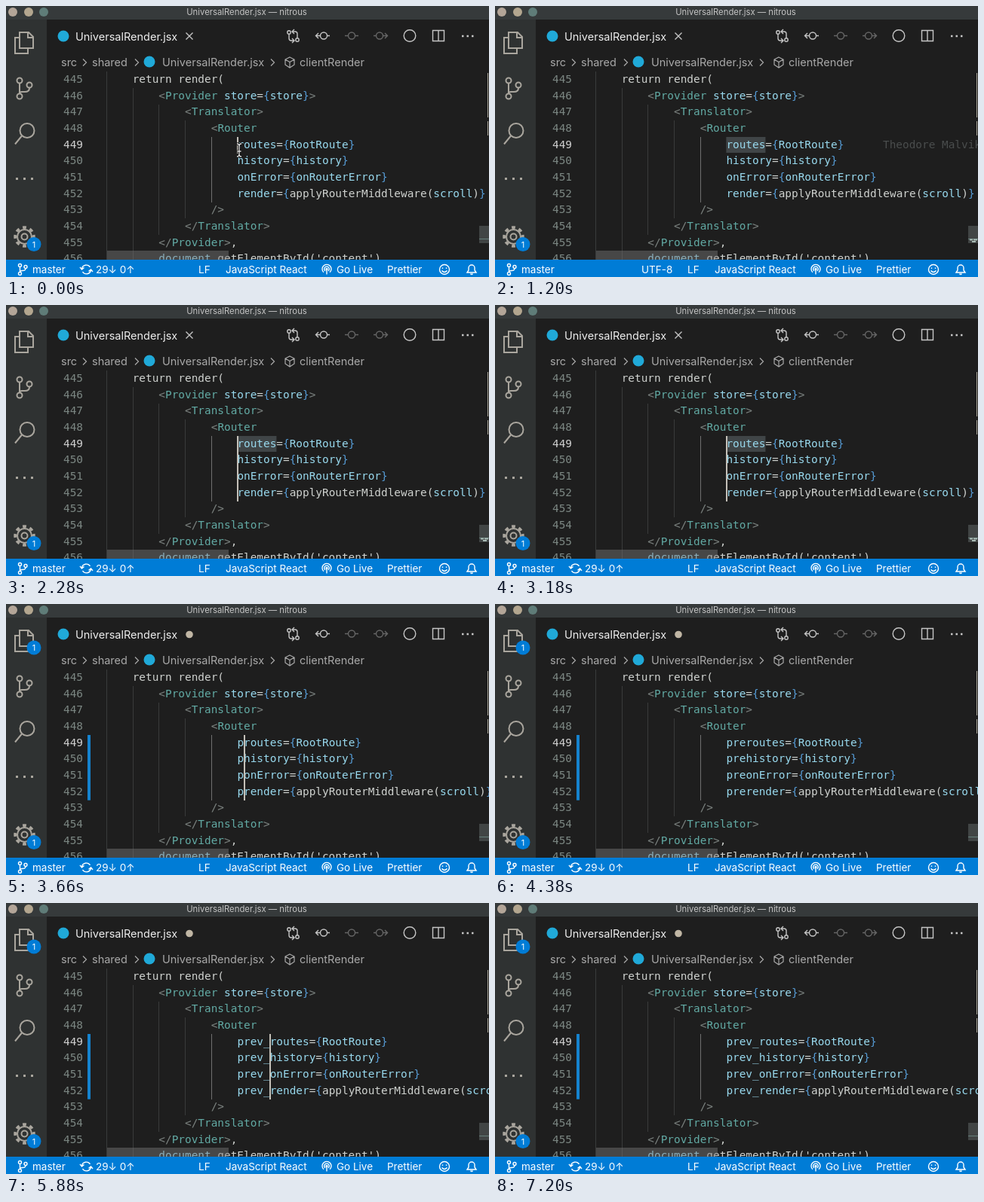
These frames come from a looping animation (640x360 px, 7.44 s). An HTML page:

```html
<!DOCTYPE html>
<html lang="en">
<head>
<meta charset="utf-8">
<title>Multi-cursor editing</title>
<style>
  html, body { margin: 0; width: 100%; height: 100%; overflow: hidden; background: #1e1e1e; }
  svg { display: block; width: 640px; height: 360px; }
  text { font: 14.5px Inter, sans-serif; fill: #a9a9a9; white-space: pre; }
  .title { font-size: 11.3px; fill: #c4c4c4; }
  .status text { font-size: 13.5px; fill: #fff; }
  .badge circle { fill: #007cd6; }
  .badge text { font-size: 11px; fill: #fff; text-anchor: middle; }
  .code text { font: 14.4px "DejaVu Sans Mono", monospace; fill: #cfd2cf; }
  .code .number { fill: #7c8783; }
  .code .current { fill: #d0d0d0; }
  .code .blame { fill: #4a4d4d; }
  .punct { fill: #7c8380; }
  .brace { fill: #569cd6; }
  .tag { fill: #62aaa4; }
  .attr { fill: #98d9ee; }
  .icon { fill: none; stroke: #c5c5c5; stroke-width: 1.4; }
  .side { stroke: #aaa69e; stroke-width: 2; }
  .dim { stroke: #666; }
  .thin { stroke: #a9a9a9; stroke-width: 1.2; }
  .status .icon { stroke: #fff; }
</style>
</head>
<body>
<svg viewBox="0 0 640 360">
  <rect width="640" height="360" fill="#1e1e1e"/>

  <g class="code" id="code"></g>

  <!-- scrollbars and overview -->
  <rect x="134" y="325" width="161" height="12" fill="#797979" opacity=".45"/>
  <rect x="627" y="292" width="13" height="23" fill="#414545"/>
  <path d="M627 309.500h13" stroke="#66807c"/>
  <path id="marks" d="M629 310.500h4M634 310.500h5M632 313h5" stroke="#a9bbb5" stroke-width="2"/>
  <path d="M638.500 89v59M638.500 153v19" stroke="#b0ab9e"/>

  <!-- title bar -->
  <rect width="640" height="18" fill="#363a3b"/>
  <circle cx="9" cy="8" r="6" fill="#b3a598"/>
  <circle cx="30" cy="8" r="6" fill="#b3a68f"/>
  <circle cx="50" cy="8" r="6" fill="#5f7c78"/>
  <text class="title" x="319" y="12" text-anchor="middle">UniversalRender.jsx — nitrous</text>

  <!-- activity bar -->
  <rect y="18" width="54" height="319" fill="#2f3232"/>
  <g class="icon side">
    <path d="M18 35h12l6 6v15h-18zM29 35v7h7M18 42h-6v21h17v-7"/>
    <circle cx="18" cy="99" r="3.500"/><circle cx="18" cy="120" r="3.500"/><circle cx="31" cy="105" r="3.500"/>
    <path d="M18 103v13M31 109q0 5-6 5h-4q-3 0-3 3"/>
    <circle cx="28" cy="165.500" r="9.500"/><path d="M21 172.500L12 183.500"/>
    <path d="M13 229.500h3M23 229.500h3M33 229.500h3" stroke-width="3"/>
    <circle cx="24.500" cy="306.500" r="4"/>
    <circle cx="24.500" cy="306.500" r="9.500"/>
    <circle cx="24.500" cy="306.500" r="12.200" stroke-width="4" pathLength="16" stroke-dasharray="1" stroke-dashoffset=".5"/>
  </g>
  <g class="badge"><circle cx="37" cy="316.500" r="9.500"/><text x="37" y="320.500">1</text></g>
  <g class="badge" id="unsaved"><circle cx="37" cy="58" r="9.500"/><text x="37" y="62">1</text></g>

  <!-- tab and editor actions -->
  <circle cx="76" cy="40" r="7.500" fill="#20a9d8"/>
  <text x="92" y="45.500" style="fill:#eee">UniversalRender.jsx</text>
  <path id="close" class="icon" d="M238.500 35.500l9 9m0-9l-9 9"/>
  <circle id="dirty" cx="243" cy="40.500" r="4.800" fill="#c0b6a4"/>
  <g class="icon">
    <circle cx="375" cy="35" r="2.200"/><circle cx="386" cy="45" r="2.200"/>
    <path d="M375 37v6q0 3 3 3h4m-3-3l3 3-3 3M386 43v-6q0-3-3-3h-4m3-3l-3 3 3 3"/>
    <circle cx="421" cy="39.500" r="4.500"/><path d="M425.500 39.500h3.500M416.500 39.500h-6m3.500-3.500l-3.500 3.500 3.500 3.500"/>
    <g class="dim">
      <circle cx="458" cy="39.500" r="4.500"/><path d="M449 39.500h4.500M462.500 39.500h4.500"/>
      <circle cx="495" cy="39.500" r="4.500"/><path d="M487 39.500h3.500M499.500 39.500h6m-3.500-3.500l3.500 3.500-3.500 3.500"/>
    </g>
    <circle cx="535" cy="39.500" r="7.800"/>
    <path d="M565.500 32.500h15v14h-15zM573 32.500v14"/>
    <path d="M604 40h2.500M610.500 40h2.500M617 40h2.500" stroke-width="2.500"/>
  </g>

  <!-- breadcrumbs -->
  <text x="73" y="80">src</text>
  <text x="114" y="80">shared</text>
  <circle cx="190" cy="74" r="7.500" fill="#20a9d8"/>
  <text x="207" y="80">UniversalRender.jsx</text>
  <text x="389" y="80">clientRender</text>
  <path class="icon thin" d="M102 70.500l4.500 4.500-4.500 4.500M171 70.500l4.500 4.500-4.500 4.500M351 70.500l4.500 4.500-4.500 4.500M376 68l6 3v7l-6 4-6-4v-7zM370 71l6 3.500 6-3.500M376 74.500v7.500"/>

  <!-- status bar -->
  <g class="status">
    <rect y="337" width="640" height="23" fill="#007cd6"/>
    <g class="icon">
      <circle cx="18.500" cy="344.500" r="2"/><circle cx="18.500" cy="355.500" r="2"/><circle cx="26" cy="346.500" r="2"/>
      <path d="M18.500 346.500v7M26 348.500q0 3-4 3-3.500 0-3.500 2"/>
      <circle cx="425" cy="349.500" r="1"/>
      <path d="M425 350.500v6M423 352a3.300 3.300 0 1 1 4 0M421 353.800a6 6 0 1 1 8 0"/>
      <circle cx="581" cy="350" r="6.500"/><path d="M577.500 351.500q3.500 4 7 0M578.500 347.500v1.500M583.500 347.500v1.500"/>
      <path d="M611 354h12l-2-3v-3a4 4 0 0 0-8 0v3zM615.500 355.500q1.500 2 3 0"/>
    </g>
    <text x="35" y="355">master</text>
    <g id="sync">
      <path class="icon" d="M100.500 349a6 6 0 0 1 11-2m1 4a6 6 0 0 1-11 2M98 347l2.500 3 3-2.500M115 353l-2.500-3-3 2.500"/>
      <text x="119" y="355">29↓ 0↑</text>
    </g>
    <text id="encoding" x="194" y="355">UTF-8</text>
    <text x="255" y="355">LF</text>
    <text x="291" y="355">JavaScript React</text>
    <text x="438" y="355">Go Live</text>
    <text x="505" y="355">Prettier</text>
  </g>

  <g id="mouse" fill="none">
    <path d="M306 183q3 0 3 3v11q0 3-3 3M312 183q-3 0-3 3M309 197q0 3 3 3M306.500 193h5" stroke="#111" stroke-width="3.500"/>
    <path d="M306 183q3 0 3 3v11q0 3-3 3M312 183q-3 0-3 3M309 197q0 3 3 3M306.500 193h5" stroke="#ddd" stroke-width="1.300"/>
  </g>
</svg>

<script>
const LOOP = 7440, CHAR = 8.669, PITCH = 65 / 3, LEFT = 133, FIRST = 445;
const EDIT_ROW = 4, EDIT_X = LEFT + 20 * CHAR;

// indent level and source of each visible line
const lines = [
  [1, "return render("],
  [2, "<Provider store={store}>"],
  [3, "<Translator>"],
  [4, "<Router"],
  [5, "routes={RootRoute}"],
  [5, "history={history}"],
  [5, "onError={onRouterError}"],
  [5, "render={applyRouterMiddleware(scroll)}"],
  [4, "/>"],
  [3, "</Translator>"],
  [2, "</Provider>,"],
  [2, "document.getElementById('content')"]
];
// start time and typed prefix
const typing = [[0, ""], [3480, "p"], [3720, "pr"], [3900, "pre"], [4440, "prev"], [5760, "prev_"]];
const caretOn = [[0, 300], [720, 1200], [1560, 2640], [3120, 4380], [4440, 4860], [5280, 6240], [6720, 7140]];
const cursorAdded = [0, 1560, 1740, 1920];

const $ = id => document.getElementById(id);
const show = (el, on) => el.setAttribute("visibility", on ? "visible" : "hidden");
const indent = level => LEFT + level * 4 * CHAR;
const baseline = row => 102 + row * PITCH;
const rowTop = row => Math.round(baseline(row) - 14.7);
const escape = s => s.replace(/</g, "&lt;");

const syntax = /(?<punct><\/?|\/?>)|(?<brace>[{}])|(?<tag>\b(?:Provider|Translator|Router)\b)|(?<plain>return|render\(|applyRouterMiddleware|getElementById|'content'|[\s()=,.]+)|(?<attr>\w+)/g;
function paint(source) {
  return [...source.matchAll(syntax)].map(m => {
    const kind = Object.keys(m.groups).find(k => m.groups[k] !== undefined);
    return `<tspan class="${kind}">${escape(m[0])}</tspan>`;
  }).join("");
}

function guide(level, from, to, colour = "#393b3b") {
  const x = Math.round(indent(level)) + .5;
  return `<path d="M${x} ${rowTop(from)}V${rowTop(to)}" stroke="${colour}"/>`;
}

const editRows = [0, 1, 2, 3].map(i => EDIT_ROW + i);
$("code").innerHTML =
  guide(0, 0, 12) + guide(1, 1, 12) + guide(2, 2, 10) + guide(3, 3, 9) + guide(4, 4, 8, "#707070") +
  `<rect id="word" x="${EDIT_X}" y="${rowTop(EDIT_ROW)}" width="${6 * CHAR}" height="21" fill="#404547"/>` +
  `<rect id="changed" x="108" y="${rowTop(EDIT_ROW)}" width="4" height="${4 * PITCH}" fill="#1583cf"/>` +
  lines.map(([level, source], row) =>
    `<text class="number ${row === EDIT_ROW ? "current" : ""}" x="76" y="${baseline(row)}">${FIRST + row}</text>
     <text x="${indent(level)}" y="${baseline(row)}"><tspan class="attr prefix"></tspan>${paint(source)}</text>`
  ).join("") +
  `<text class="blame" id="blame" x="514" y="${baseline(EDIT_ROW)}">Theodore Malvik</text>` +
  editRows.map(row => `<rect class="caret" y="${rowTop(row)}" width="2" height="22" fill="#c4c0b8"/>`).join("");

const prefixes = [...document.querySelectorAll(".prefix")].slice(EDIT_ROW, EDIT_ROW + 4);
const carets = document.querySelectorAll(".caret");

function draw(now) {
  const t = now % LOOP;
  const typed = typing.filter(([start]) => t >= start).pop()[1];
  const edited = typed !== "";
  const annotated = t >= 240 && t < 1560;
  const highlighted = t >= 240 && !edited;
  const lit = caretOn.some(([on, off]) => t >= on && t < off);

  prefixes.forEach(p => { if (p.textContent !== typed) p.textContent = typed; });
  carets.forEach((c, i) => {
    c.setAttribute("x", Math.floor(EDIT_X + typed.length * CHAR));
    show(c, lit && t >= cursorAdded[i]);
  });
  show($("word"), highlighted);
  show($("marks"), highlighted);
  show($("blame"), annotated);
  show($("encoding"), annotated);
  show($("sync"), !annotated);
  show($("mouse"), t < 120);
  show($("changed"), edited);
  show($("unsaved"), edited);
  show($("dirty"), edited);
  show($("close"), !edited);
}

const start = performance.now();
function tick() {
  draw(performance.now() - start);
  requestAnimationFrame(tick);
}
tick();
</script>
</body>
</html>
```
